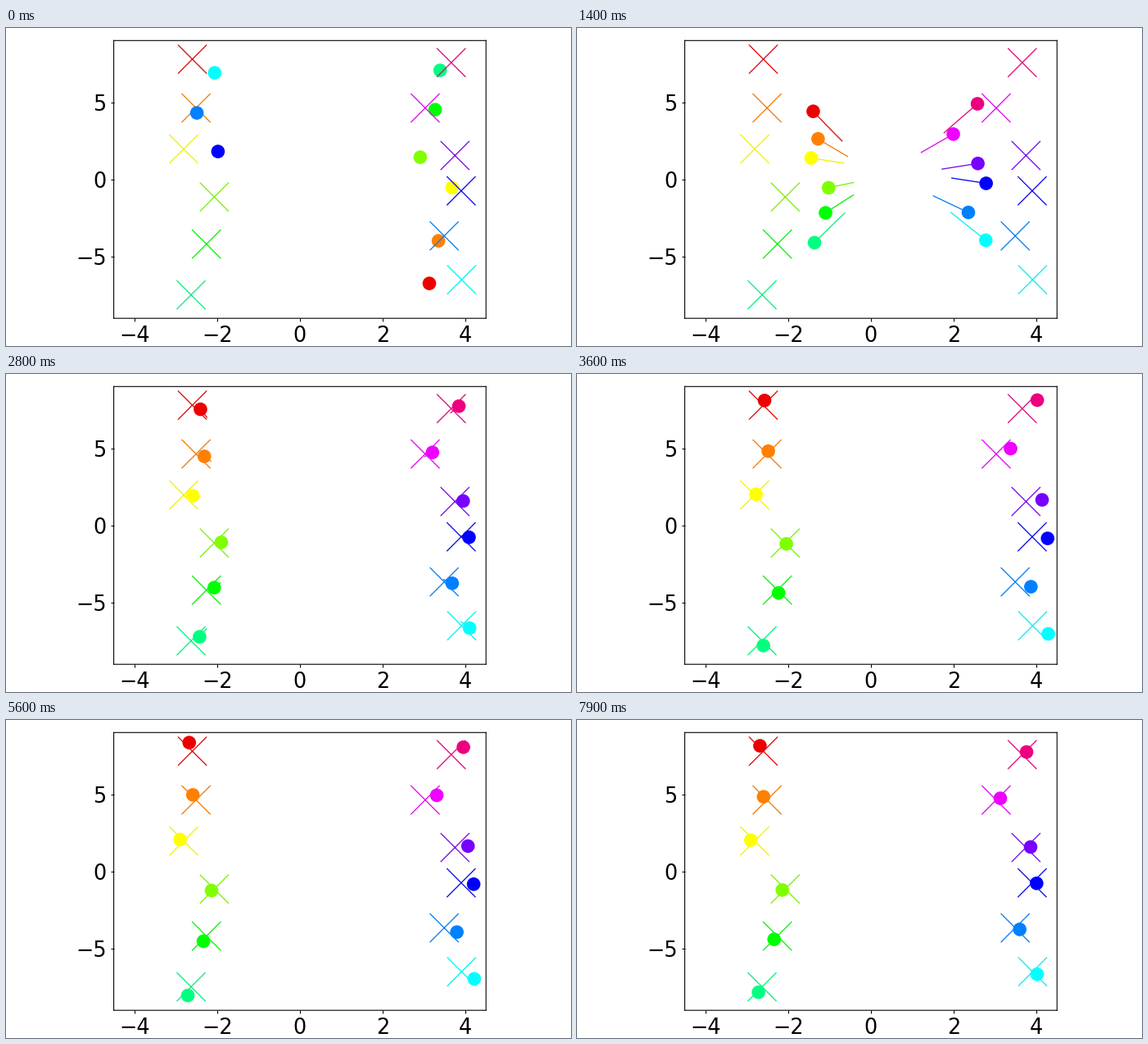
These frames come from a looping animation (690x388 px, 8000 ms). A matplotlib script:

```python
import colorsys
import numpy as np
import matplotlib.pyplot as plt
from matplotlib.animation import FuncAnimation
from matplotlib.patches import Ellipse

W, H, DPI = 690, 388, 64
PT = 72 / DPI                                   # points per pixel
LEFT, RIGHT, TOP, BOTTOM = 131.6, 586.2, 15.3, 354.2
UX, UY = 9 / (RIGHT - LEFT), 18 / (BOTTOM - TOP)  # data units per pixel
FRAMES, TAIL = 80, 4

START = [(3.13, -6.74), (3.35, -3.98), (3.68, -.53), (2.91, 1.44), (3.27, 4.52), (3.39, 7.07),
         (-2.06, 6.91), (-2.49, 4.31), (-1.98, 1.81), (-2.39, -1.16), (-2.45, -4.24), (-2.06, -6.42)]
GOAL = [(-2.60, 7.79), (-2.51, 4.63), (-2.81, 1.97), (-2.07, -1.14), (-2.26, -4.19), (-2.63, -7.48),
        (3.91, -6.50), (3.49, -3.66), (3.90, -.74), (3.75, 1.55), (3.03, 4.63), (3.66, 7.57)]

steps = np.arange(FRAMES)


def approach(rate, over, fade):
    """Exponential approach to 1 with an overshoot that fades out slowly."""
    return 1 - (1 + over) * np.exp(-rate * steps) + over * np.exp(-(steps / fade) ** 2)


GO_LEFT = np.column_stack([approach(.107, .017, 200), approach(.0885, .085, 71.5)])
GO_RIGHT = np.column_stack([approach(.083, .2, 52), approach(.092, .13, 52)])


def colours(n):
    """Disc colour on the hue wheel, and a slightly muted one for thin lines."""
    r, g, b = colorsys.hsv_to_rgb(n / 12, 1, 1)
    if g < .4:                                  # reds and magentas are a bit deeper
        r *= .93
    rgb = np.array([r, g, b])
    return rgb, .88 * rgb + .06


plt.rcParams["font.family"] = "DejaVu Sans"
fig = plt.figure(figsize=(W / DPI, H / DPI), dpi=DPI, facecolor="white")
ax = fig.add_axes([LEFT / W, 1 - BOTTOM / H, (RIGHT - LEFT) / W, (BOTTOM - TOP) / H])
ax.set(xlim=(-4.5, 4.5), ylim=(-9, 9), xticks=range(-4, 5, 2), yticks=(-5, 0, 5))
ax.tick_params(labelsize=25.5 * PT, length=4.45 * PT, width=1.02 * PT, pad=4.45 * PT)
for spine in ax.spines.values():
    spine.set(linewidth=1.1 * PT, snap=False)

paths, tails, discs = [], [], []
cross = 17.6 * np.array([[-1, 1, np.nan, -1, 1], [-1, 1, np.nan, 1, -1]])
for n, (start, goal) in enumerate(zip(np.array(START), np.array(GOAL))):
    disc, line = colours(n)
    z = 3 + n / 20
    progress = GO_LEFT if goal[0] < 0 else GO_RIGHT
    paths.append(start + (goal - start) * progress)
    ax.plot(goal[0] + UX * cross[0], goal[1] + UY * cross[1],
            color=line, lw=1.35 * PT, solid_capstyle="butt", zorder=z)
    tails += ax.plot([], [], color=line, lw=1.35 * PT, zorder=z + .01)
    discs.append(ax.add_patch(Ellipse(start, 16.6 * UX, 16.6 * UY, color=disc,
                                      lw=0, zorder=z + .02)))


def draw(i):
    for n, (path, tail, disc) in enumerate(zip(paths, tails, discs)):
        tail.set_data(*path[max(0, i - TAIL):i + 1].T)
        disc.center = path[i]
        disc.set_visible(i > 0 or n < 9)        # the last three join one step late
    return tails + discs


anim = FuncAnimation(fig, draw, frames=FRAMES, interval=100, repeat=True,
                     repeat_delay=0, init_func=lambda: draw(0), blit=False)
plt.show()
```
